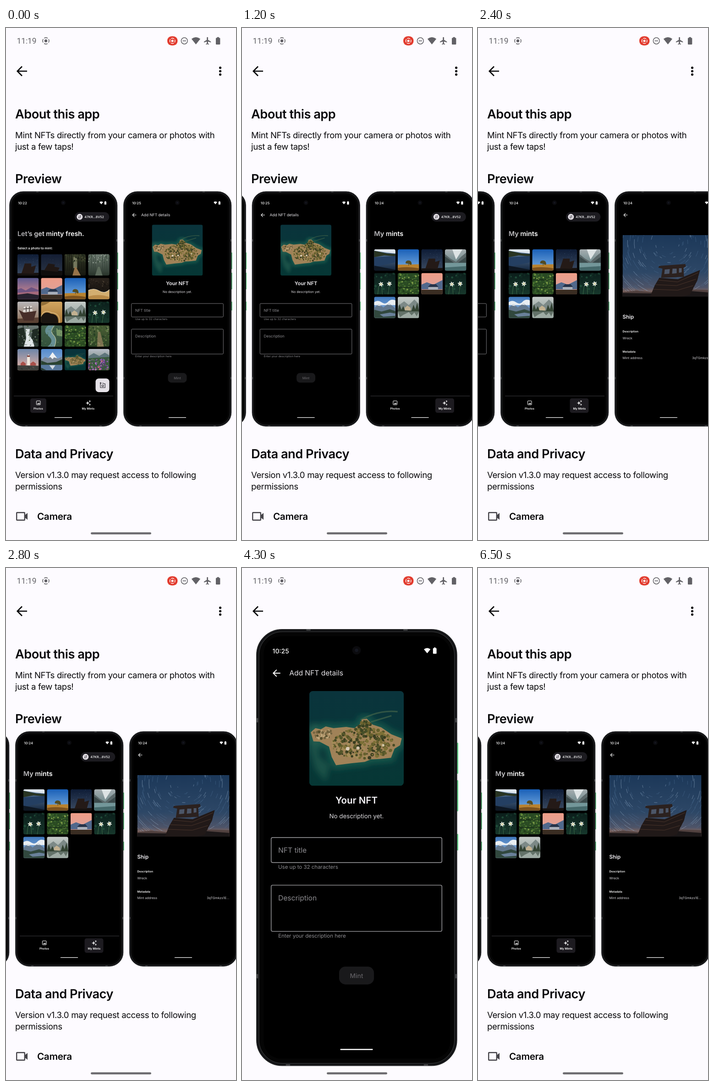
Recreate the animation shown at these times as an HTML page. Size 502 by 1115 pixels, loop 6800 ms.

```html
<!DOCTYPE html>
<html lang="en">
<head>
<meta charset="utf-8">
<title>App preview</title>
<style>
html, body { margin: 0; height: 100%; overflow: hidden; background: #fdfbff }
svg { display: block; width: 100%; height: 100% }
text { font-family: Inter, Roboto, sans-serif; text-rendering: geometricPrecision; white-space: pre }
.tight { letter-spacing: -.018em }
</style>
</head>
<body>
<svg id="stage" viewBox="0 0 502 1115"></svg>
<script>
let seed = 7;
const rnd = () => (seed = seed * 16807 % 2147483647) / 2147483647;
const path = (fill, d, more = '') => `<path fill="${fill}" d="${d}" ${more}/>`;
const line = (color, w, d, more = '') => path('none', d, `stroke="${color}" stroke-width="${w}" ${more}`);
const rect = (x, y, w, h, r, fill, more = '') =>
  `<rect x="${x}" y="${y}" width="${w}" height="${h}" rx="${r}" fill="${fill}" ${more}/>`;
const dot = (x, y, r, fill, more = '') => `<circle cx="${x}" cy="${y}" r="${r}" fill="${fill}" ${more}/>`;
const text = (s, x, y, size, fill = '#fff', weight = 400, more = '') =>
  `<text x="${x}" y="${y}" font-size="${size}" fill="${fill}" font-weight="${weight}" ${more}>${s}</text>`;
const mid = 'text-anchor="middle"', end = 'text-anchor="end"';
const at = (x, y, k, body) => `<g transform="translate(${x} ${y}) scale(${k})">${body}</g>`;

// Random specks inside an ellipse or, with box set, a rectangle
function specks(n, colors, x, y, w, h, r, box = true) {
  let out = '';
  while (n--) {
    let u = rnd() * 2 - 1, v = rnd() * 2 - 1;
    if (!box) { const k = Math.max(Math.abs(u), Math.abs(v)) / (Math.hypot(u, v) || 1); u *= k; v *= k; }
    out += dot((x + u * w).toFixed(1), (y + v * h).toFixed(1), (r * (.5 + rnd())).toFixed(2),
      colors[rnd() * colors.length | 0]);
  }
  return out;
}
const cover = (n, colors, r, y = 23, h = 23) => specks(n, colors, 23, y, 23, h, r);
const trunks = color => [2, 7, 11, 15, 31, 36, 40, 44].map(x => line(color, 1.2, `M${x} 0V36`)).join('');
const flower = (x, y) => [0, 60, 120].map(a =>
  `<ellipse cx="${x}" cy="${y}" rx="5.6" ry="1.5" fill="#e3e8df" transform="rotate(${a + 15} ${x} ${y})"/>`).join('') +
  dot(x, y, 1.4, '#d9cf7c');

const islandShape = 'M.7 20L3 18 5.6 18.6 8 17.2 11.8 18 18 17.4 22 18 24.8 15.9 25.6 13.8 28 13.4 30.8 16.3 35 17.6 ' +
  '40 21 45 23 44.2 26.3 41.5 28 39.8 32.4 34.2 33 30 33.2 27 34.4 20.8 35 13 36 10.9 32 9.6 27 5 24.6 2 24.4Z';

// Each scene: top colour, bottom colour, shapes in a 46 by 46 box
const scenes = {
  night: ['#0e1c36', '#3b4b62', cover(45, ['#7f97bb', '#4c648b'], .3, 16, 16) +
    path('#171210', 'M0 41L46 40V46H0z') + path('#241a17', 'M9 41L13 29 16 20H30V27L40 24 35 42z')],
  wreckNight: ['#131d33', '#2c3646', cover(25, ['#4c648b'], .25, 12, 12) +
    path('#0f0d0c', 'M0 34L46 36V46H0z') + path('#1f1714', 'M7 35L16 20 30 22 29 27 40 29 36 38z')],
  forest: ['#3a3f2c', '#15160f', path('#74775c', 'M19 6H27V30H19z') + trunks('#14150f') +
    cover(60, ['#2b3322', '#1d2418', '#454b30'], 1.3, 8, 10) + path('#967349', 'M22 28H25L35 46H17z')],
  mist: ['#6d7a70', '#28332a', trunks('#35433a') + cover(60, ['#50614f', '#3a4b3c', '#8a958a'], 1, 9, 10) +
    path('#5c6a5b', 'M21 27H25L31 46H15z')],
  sunset: ['#5b598f', '#ed8f86', path('#6d5380', 'M0 25L8 22 18 27 30 20 46 26V46H0z') +
    path('#a5697c', 'M0 32L46 29V37H0z') + path('#26222f', 'M0 36L22 33 46 37V46H0z')],
  barn: ['#ef9d88', '#d6a3a0', path('#50688c', 'M0 25L12 20 26 25 46 15V35H0z') +
    path('#26334a', 'M14 30L20 24H32L37 30z') + path('#a9aeb9', 'M15 30H36V37H15z') +
    path('#3a2d22', 'M0 36H46V46H0z')],
  tree: ['#1a60b8', '#7db0e2', path('#b8822f', 'M0 33L46 32V46H0z') + path('#7d521d', 'M0 40Q20 36 46 41V46H0z') +
    path('#524b22', 'M17 30Q17 24 23 24T30 30 24 31V35H23V31z')],
  beach: ['#2a231c', '#0d0b09', cover(40, ['#4b4033', '#171310'], 1, 12, 11) +
    path('#d3ae70', 'M0 27Q12 21 24 28T46 25V46H0z') + line('#e7dcc2', 1, 'M0 27Q12 21 24 28T46 25') +
    path('#b98b49', 'M0 40Q22 33 46 41V46H0z')],
  wreck: ['#b9b7b8', '#8b6c54', path('#594033', 'M0 37L46 34V46H0z') +
    path('#472e29', 'M3 18L15 24 41 20 35 41H14z') + path('#dad5d0', 'M12 23L14 11 31 9 33 21z') +
    line('#463d3a', 1.5, 'M13 16L32 14M19 11V22M26 10V22')],
  rock: ['#d2a661', '#a77839', path('#1a1511', 'M0 34Q7 18 22 26 39 27 37 46H0z') +
    line('#e1c58e', 1, 'M0 32Q7 15 23 24 42 25 40 46') + path('#947039', 'M0 0H20Q10 8 0 9z')],
  cabin: ['#c5cbc9', '#7f918b', path('#7c8987', 'M0 20L14 10 24 18 36 6 46 16V30H0z') +
    path('#334333', 'M0 31L4 16 8 28 12 20 16 30H30L34 17 38 27 42 13 46 30V33H0z') +
    path('#c2b191', 'M15 29V24L21 19 28 24V30z') + path('#9eaba4', 'M0 32H46V46H0z') +
    path('#4b5b50', 'M0 32H46L41 42 36 34 30 40 24 33 12 39 5 44z', 'opacity=".7"')],
  daff: ['#0b1e1b', '#17382c', cover(26, ['#1f4a38', '#102a22'], 2) +
    line('#3e6b48', 1, 'M16 24L18 46M33 25L30 46M8 46L10 28') + flower(15, 24) + flower(33, 23)],
  falls: ['#6e7a76', '#2d3a35', path('#1f2a23', 'M0 8L14 4 18 30 12 46H0zM46 6L32 10 30 34 46 40z') +
    path('#dfe5e6', 'M18 8H27L25 20 33 32 37 46H14L19 28z') + cover(50, ['#526a43', '#243227', '#75827c'], 1)],
  river: ['#42614b', '#33513b', path('#668f94', 'M16 0Q2 12 16 23T14 46H29Q36 30 27 21T30 0z') +
    line('#bdc49b', 1.2, 'M30 0Q18 12 27 21T29 46') + path('#759465', 'M33 6L46 12V24L34 22z') +
    cover(25, ['#31503b', '#587550'], 1)],
  rows: ['#284923', '#2c4c22', cover(110, ['#4d762f', '#1c3419', '#799746', '#385f2b'], 1.5) +
    line('#172d18', 1.5, 'M0 15H46M0 31H46')],
  garden: ['#4c5f37', '#2b4224', cover(100, ['#55733c', '#263f24', '#76835b', '#3b552c'], 1.4) +
    path('#a18864', 'M21 14L26 14 34 46H19z', 'opacity=".65"')],
  light: ['#6d85a8', '#eab3a1', path('#efe7dd', 'M21 35V16L24 11 27 16V35z') + rect(21, 14, 6, 3, 0, '#7e3d38') +
    path('#a9504a', 'M7 36V31L12 27 18 31V36zM28 36V31L34 27 40 31V36z') + path('#3e403d', 'M0 35L46 36V46H0z') +
    cover(20, ['#59534c', '#2a2e2d'], 1, 42, 4)],
  lake: ['#558bcd', '#a4bedb', path('#798594', 'M0 24L9 17 16 20 25 7 36 21 46 16V32H0z') +
    path('#eef1f4', 'M16 20L25 7 35 20 28 18 25 22 20 17z') + path('#2b4331', 'M0 25L14 30 33 28 46 22V35H0z') +
    path('#58789c', 'M0 34H46V46H0z') + path('#d3dbe3', 'M18 35H31L25 44z') + path('#253d31', 'M0 40L12 46H0z')],
  island: ['#0a343c', '#063735',
    `<g filter="url(#soft)">${path('#1d5f51', islandShape, 'stroke="#1d5f51" stroke-width="4" opacity=".75"')}
      ${path('#276352', 'M0 16H5V32L10 36 8 44 3 38 0 28z', 'opacity=".6"')}</g>` +
    line('#4a6a4c', .7, 'M25 14Q34 9 43 10M30 15L40 12', 'opacity=".6"') + path('#a08258', islandShape) +
    specks(300, ['#66602d', '#464a25', '#7c7036', '#a58c58', '#55562a', '#383c20'], 26, 25.5, 15.5, 7.3, .6, false) +
    specks(45, ['#464f28', '#6e642f', '#3a4122'], 27, 17.5, 3.2, 3, .6, false) +
    specks(40, ['#736440', '#bca479', '#574f2d'], 7, 21, 5, 2.4, .5, false) +
    dot(18.7, 28, .9, '#d9ccb7') + dot(23.7, 27.7, .8, '#d3c4ad') + dot(36, 26.3, .6, '#cfc5a5')],
  bloom: ['#b8bdc8', '#536e53', path('#5e757b', 'M0 16L12 9 24 15 36 8 46 14V26H0z') +
    path('#39593d', 'M0 20L46 17V46H0z') + cover(110, ['#8a59ad', '#b171bf', '#5c3b80', '#4c7046', '#d6628b'], 1.3, 34, 12)],
  shore: ['#6282a9', '#14263d', path('#dfe7ef', 'M0 0H46V9L26 7 0 3z') + path('#293523', 'M0 3L28 9 46 10V15L22 13 0 17z') +
    path('#243f62', 'M0 17L46 14V28L0 38z') + path('#0e1722', 'M0 35L46 44V46H0z')],
  fjord: ['#a6aeb1', '#4d7375', path('#5b686a', 'M0 10L12 20 24 27 36 15 46 7V31H0z') +
    path('#dde3e4', 'M16 0H38L24 22z') + path('#3b4a4b', 'M0 15L20 29H0zM46 16L28 29H46z') +
    path('#73979a', 'M0 29H46V46H0z') + path('#45696b', 'M0 39L46 36V46H0z')],
  alps: ['#3f78bd', '#a6c1df', path('#e9eef3', 'M0 12Q8 6 16 12T30 11 46 8V18H0z') +
    path('#62778d', 'M0 24L10 16 20 23 32 14 46 25V38H0z') + path('#dde2e6', 'M7 19L10 16 15 20zM28 17L32 14 36 18z') +
    path('#31483e', 'M0 28L16 32 34 27 46 31V46H0z') + path('#69809a', 'M12 38L34 34 46 36V41L20 43z')],
};

const defs = Object.entries(scenes).map(([id, [top, bottom, shapes]]) => `
  <linearGradient id="${id}Sky" x2="0" y2="1"><stop stop-color="${top}"/><stop offset="1" stop-color="${bottom}"/></linearGradient>
  <g id="${id}">${rect(0, 0, 46, 46, 0, `url(#${id}Sky)`)}${shapes}</g>`).join('');

const photo = (id, x, y, size, clip) =>
  at(x, y, size / 46, `<g clip-path="url(#${clip})"><use href="#${id}"/></g>`);
const grid = (names, y) => names.split(' ').map((id, i) =>
  photo(id, 16.8 + i % 4 * 51.5, y + (i >> 2) * 51.6, 46.6, 'thumb')).join('');

const wifi = 'M-8 -4Q0 -10 8 -4L0 6z';
const arrow = (x, y, k, color) => at(x, y, k, line(color, 2.7, 'M12 0H-9M1 -10.2L-9.2 0 1 10.2'));

function phone(id, time, screen) {
  const button = (y, h) => rect(234.6, y, 1.9, h, .6, '#2b6b42') + rect(235.4, y, 1.2, h, .5, '#6fe092');
  const band = (x, y, w, h) => rect(x, y, w, h, 0, '#4a4b4d');
  return `<g id="${id}">
    ${button(489, 36)}${button(533, 36)}${button(596, 19)}
    ${rect(-.5, 356, 235.4, 511.4, 30, '#131416', 'stroke="#242527" stroke-width=".7"')}
    ${band(-.6, 460, 2, 5)}${band(233, 460, 2, 5)}${band(-.6, 760, 2, 5)}${band(233, 760, 2, 5)}
    ${band(58, 355.8, 5, 1.6)}${band(172, 355.8, 5, 1.6)}${band(34, 865.8, 5, 1.6)}${band(196, 865.8, 5, 1.6)}
    ${rect(2.4, 358.8, 229.6, 505.8, 27.5, '#050505', 'stroke="#313234" stroke-width=".7"')}
    ${rect(8, 364, 219, 495, 20, '#000')}
    ${dot(117, 380.5, 5, '#0b0b0e')}${dot(117, 380.5, 2, '#14161f')}
    ${text(time, 18.3, 384.2, 7.5, '#fff', 500)}
    ${at(200, 381.2, .48, path('#fff', wifi))}
    ${rect(206.8, 378, 4.2, 6.6, .7, '#fff')}${rect(208, 377.2, 1.8, 1.5, 0, '#fff')}
    ${screen}
    ${line('#fff', 1.3, 'M98.5 848.4H135.5', 'stroke-linecap="round"')}</g>`;
}

const wallet = rect(142, 401, 75.5, 20.5, 10.2, '#1c1b20') + dot(152.8, 411.2, 6.4, '#e6e2e8') +
  line('#29272d', .9, 'M149.8 409.6H155.6M154 408L155.7 409.6 154 411.2M156 413H150.2M151.8 411.4L150 413 151.8 414.6') +
  text('47KR...8V52', 163.3, 413.8, 7.1, '#fff', 500);

function tabs(x, w) {
  const star = (x, y, r) => path('#fff', `M${x} ${y - r}Q${x} ${y} ${x + r} ${y}Q${x} ${y} ${x} ${y + r}Q${x} ${y} ${x - r} ${y}Q${x} ${y} ${x} ${y - r}z`,
    'stroke="#fff" stroke-width=".5"');
  return line('#434147', .9, 'M9 801.4H226') + rect(x, 806.5, w, 31.5, 4.5, '#1d1b20') +
    rect(58.4, 812, 8.6, 8.6, 1, 'none', 'stroke="#fff"') + path('#fff', 'M59.8 819L61.6 816.5 62.8 818 64.3 815.8 66 819z') +
    text('Photos', 62.5, 830.8, 6.2, '#fff', 600, mid) +
    star(170.2, 816.8, 3.7) + star(174.9, 812.8, 1.8) + star(174.9, 820.2, 1.8) +
    text('My Mints', 171.3, 830.8, 6.2, '#fff', 600, mid);
}

const photos = text('Let’s get minty fresh.', 17, 453, 14.3, 'url(#shine)', 600) +
  text('Select a photo to mint:', 17, 481.8, 7.1, '#fff', 600) + wallet +
  grid('night wreckNight forest mist sunset barn tree beach wreck rock cabin daff falls river rows garden light lake island bloom', 492.6) +
  rect(187.5, 763.3, 30, 29.8, 7, '#e6e2e8') +
  line('#29272d', 1.1, 'M199.5 775H198V783.2H208.3V774.8H205.6L204.6 773.5H202M198.5 771.2V775M196.6 773.1H200.4') +
  dot(203.2, 779, 2, 'none', 'stroke="#29272d" stroke-width="1.1"') + tabs(45, 35);

const field = (y, h, label, hint) =>
  rect(16.7, y, 200.6, h, 1.8, 'none', 'stroke="#a3a2a6" stroke-width=".75"') +
  text(label, 25, y + 18, 8.4, '#8d8c90') + text(hint, 25, y + h + 7.1, 6.2, '#8d8c90');
const details = arrow(22.8, 407.3, .39, '#fff') + text('Add NFT details', 38, 410.2, 8.4, '#e6e4e8') +
  photo('island', 61.5, 428.3, 111, 'card') +
  text('Your NFT', 117, 560, 11, '#f5f3f7', 600, mid) + text('No description yet.', 117, 577.4, 7.15, '#e0dee2', 400, mid) +
  field(600, 29.3, 'NFT title', 'Use up to 32 characters') + field(655.8, 54.2, 'Description', 'Enter your description here') +
  rect(96.5, 751.2, 41, 21, 7.5, '#19191b') + text('Mint', 117, 764.7, 7.4, '#605f63', 500, mid);

const mints = wallet + text('My mints', 16.8, 453, 14.4, 'url(#shine)', 600) +
  grid('shore tree night fjord daff rows barn daff alps cabin', 482) + tabs(150.5, 41);

function trails() {
  let out = '';
  for (let i = 0; i < 420; i++) {
    const r = 4 + 150 * Math.sqrt(rnd()), a = rnd() * 6.283, b = a + .1 + rnd() * .18;
    const p = a => `${(103 + r * Math.cos(a)).toFixed(1)} ${(17 + r * Math.sin(a)).toFixed(1)}`;
    out += line(rnd() < .35 ? '#b5cce4' : '#56789f', .6, `M${p(a)}A${r} ${r} 0 0 1 ${p(b)}`, 'opacity=".7"');
  }
  return out;
}
const ship = `<g transform="translate(16.6 451)" clip-path="url(#wide)">${rect(0, 0, 201, 134, 0, 'url(#dusk)')}${trails()}
  ${path('#51413f', 'M0 124L30 121 64 124 140 118 201 120V134H0z')}${path('#1b1718', 'M0 126L60 127 150 122 201 126V134H0z')}
  ${path('#211918', 'M60 134L70 110 80 93 121 96 169 76 163 99 147 130 130 134z')}
  ${path('#2b211f', 'M84 93L87 73 78 71 80 67 137 63 138 68 133 71 134 91z')}
  ${path('#4c5668', 'M92 75L103 74 102 84 91 85zM109 73L118 73 118 83 108 84zM123 72L129 72 129 81 123 82z')}
  ${line('#49342a', 1, 'M78 98L120 102 165 82M72 108L118 110 160 96M67 118L120 120 154 110')}</g>`;
const detail = arrow(22.8, 407.3, .39, '#fff') + ship + text('Ship', 16.6, 633.3, 11.5, '#f5f3f7', 600) +
  text('Description', 16.6, 663.2, 6.2, '#fff', 600) + text('Wreck', 16.6, 678, 7.1, '#d6d4d8') +
  text('Metadata', 16.6, 706.6, 6.2, '#fff', 600) + text('Mint address', 16.6, 721.2, 7.1, '#d6d4d8') +
  text('3qTGmkzs1E...', 217.3, 721.2, 7.1, '#d6d4d8', 400, end);

const screens = [['10:22', photos], ['10:25', details], ['10:24', mints], ['10:24', detail]];
const strip = screens.map(([time, body], i) => at(8 + 249 * i, 0, 1, phone('phone' + i, time, body))).join('');

const ink = '#08080a', grey = '#626166';
const heading = (s, y) => text(s, 20, y, 27.2, ink, 600, 'class="tight"');
const body = (s, y) => text(s, 20, y, 18.6, ink, 400, 'class="tight"');
const statusBar = text('11:19', 23.5, 34.3, 17.3, grey, 400, 'style="font-family:Roboto,sans-serif"') +
  dot(87, 28, 3.2, grey) + dot(87, 28, 6.9, 'none', `stroke="${grey}" stroke-width="1.6" stroke-dasharray="8 2.84" stroke-dashoffset="4"`) +
  rect(352, 18, 22.5, 20, 9.5, '#e23b2e') + dot(363.2, 28, 2.6, '#fff') +
  dot(363.2, 28, 5.7, 'none', 'stroke="#fff" stroke-width="1.4" stroke-dasharray="6.8 2.15" stroke-dashoffset="3.4"') +
  dot(389.3, 28, 6.9, 'none', `stroke="${grey}" stroke-width="1.5"`) + line(grey, 1.6, 'M385.6 28H393') +
  at(414.5, 28.5, 1.2, path(grey, wifi)) +
  path(grey, 'M438.3 20.5Q439.7 19 441 20.5V25.8L447.3 29.8V31.6L441 29.6V33.5L443 35V36.3L439.7 35.3 436.3 36.3V35L438.3 33.5V29.6L432 31.6V29.8L438.3 25.8z') +
  rect(458, 21.5, 9.4, 14.5, 1.3, grey) + rect(460.6, 19.8, 4.2, 2.5, 0, grey);

document.getElementById('stage').innerHTML = `<defs>
  <clipPath id="thumb">${rect(0, 0, 46, 46, 3.8, '#000')}</clipPath>
  <clipPath id="card">${rect(0, 0, 46, 46, 1.7, '#000')}</clipPath>
  <clipPath id="wide">${rect(0, 0, 201, 134, 0, '#000')}</clipPath>
  <filter id="soft"><feGaussianBlur stdDeviation="1.4"/></filter>
  <linearGradient id="shine"><stop stop-color="#aaa9ad"/><stop offset=".6" stop-color="#fff"/></linearGradient>
  <linearGradient id="dusk" x2="0" y2="1"><stop stop-color="#1c3859"/><stop offset=".6" stop-color="#2d4766"/>
    <stop offset=".85" stop-color="#4e5468"/><stop offset=".94" stop-color="#8c685a"/></linearGradient>${defs}</defs>
  ${rect(0, 0, 502, 1115, 0, '#fdfbff')}
  <g id="list">
    ${[86.6, 94, 101.3].map(y => dot(467.6, y, 2.6, ink)).join('')}
    ${heading('About this app', 197)}
    ${body('Mint NFTs directly from your camera or photos with', 240)}${body('just a few taps!', 264.6)}
    ${heading('Preview', 338)}<g id="strip">${strip}</g>
    ${heading('Data and Privacy', 937)}
    ${body('Version v1.3.0 may request access to following', 980)}${body('permissions', 1004.6)}
    ${rect(23.2, 1055.2, 17.6, 16.6, 1, 'none', 'stroke="#454449" stroke-width="2.4"')}
    ${path('#454449', 'M41 1061L47 1056V1071L41 1066z')}${text('Camera', 68, 1071, 20.7, ink, 600, 'class="tight"')}
  </g>
  <g id="full">${at(32.6, -527.8, 1.858, '<use href="#phone1"/>')}</g>
  ${statusBar}${arrow(34, 94, 1, ink)}
  ${line('#6b6a6e', 4.6, 'M187.3 1100.5H314.7', 'stroke-linecap="round"')}`;

const [list, full, row] = ['list', 'full', 'strip'].map(id => document.getElementById(id));
// Scroll offset per 100 ms step: a slow drag with a fling, then a quick fling
const drag = [0, 2, 8, 20, 38, 63, 95, 140, 178, 205, 222, 231, 234.5];
const fling = [234.5, 250, 290, 355, 420, 456, 471, 480, 484, 485];
const scroll = k => k < 19 ? drag[Math.min(k, 12)] : fling[Math.min(k - 19, 9)];
const ease = x => (x = Math.min(1, Math.max(0, x))) * x * (3 - 2 * x);

function draw() {
  const step = Math.floor(performance.now() % 6800 / 100);
  const open = ease((step - 40) / 3) - ease((step - 61) / 4);
  row.setAttribute('transform', `translate(${-scroll(step)} 0)`);
  list.setAttribute('opacity', 1 - open);
  full.setAttribute('opacity', open);
  requestAnimationFrame(draw);
}
draw();
</script>
</body>
</html>
```
